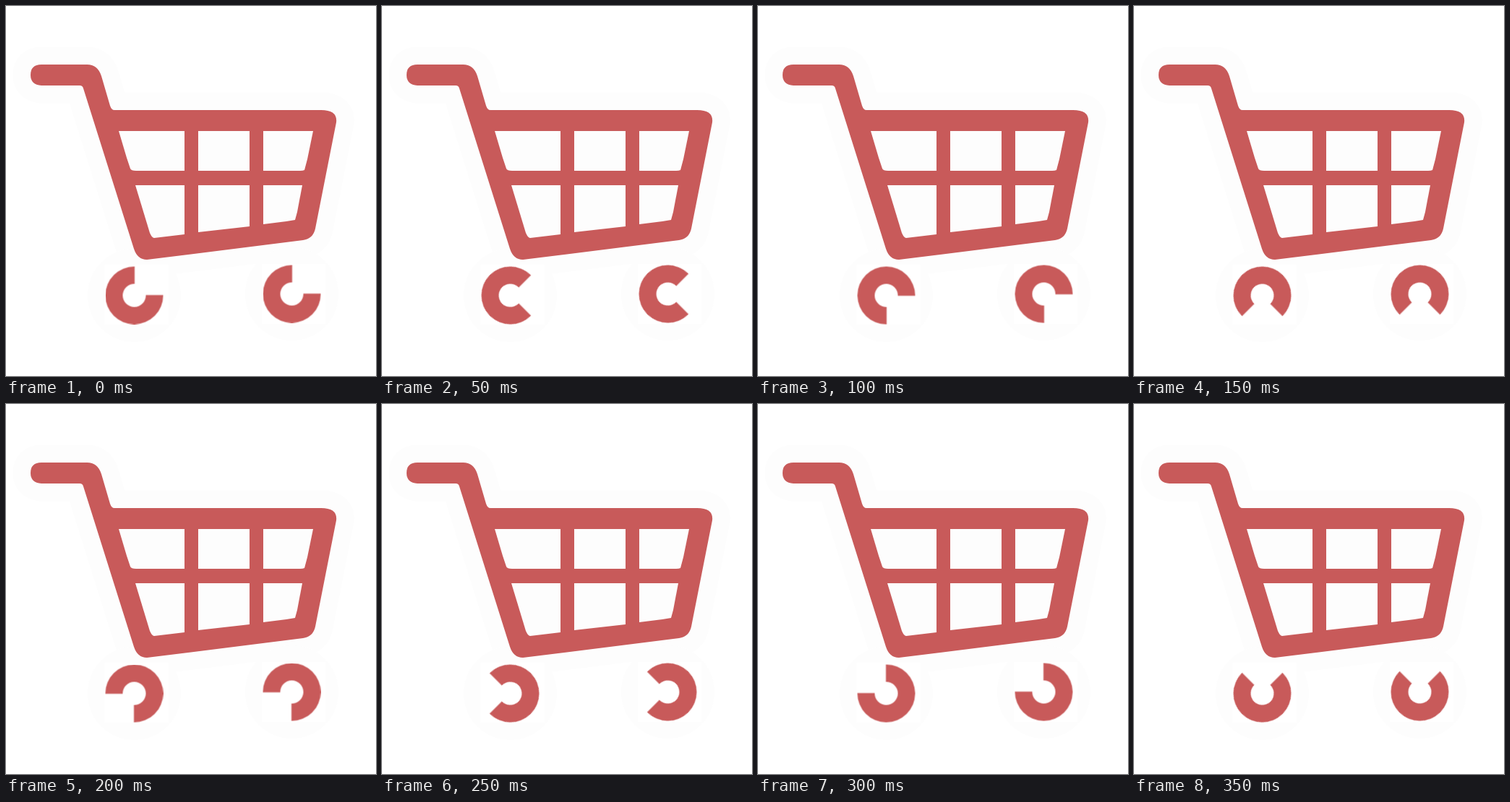
An HTML page for the animation above (400 ms loop, 512x512 px).

```html
<!DOCTYPE html>
<html lang="en">
<head>
<meta charset="utf-8">
<title>Rolling shopping cart</title>
<style>
  html, body { margin: 0; width: 100%; height: 100%; overflow: hidden; background: #fff; }
  svg { display: block; width: 100%; height: 100%; fill: #c85a5a; }
  .halo { fill: #fdfdfd; stroke: #fdfdfd; stroke-width: 49; stroke-linejoin: round; }
  .clear { fill: #fff; }
  .wheel { animation: roll 400ms steps(8) infinite; transform-origin: 0 0; }
  @keyframes roll { to { transform: rotate(360deg); } }
</style>
</head>
<body>
<svg viewBox="0 0 512 512">
  <defs>
    <path id="frame" d="M49 81H112Q127 81 132 97L144 138Q146 144 150 144H436Q459 144 457 161L428 308Q425 322 411 324L195 351Q182 351 177 336L107 114Q106 110 102 110H49Q34 109 34 95.5Q34 81 49 81Z"/>
    <path id="ring" d="M.5-40A40 40 0 1 0 40-.5H16A16 16 0 1 1 .5-16Z"/>
  </defs>

  <g class="halo">
    <use href="#frame"/>
    <circle cx="177.5" cy="400.5" r="40"/>
    <circle cx="395.5" cy="398.5" r="40"/>
  </g>
  <path class="clear" d="M136 358H225V441H136ZM354 357H442V440H354Z"/>

  <use href="#frame"/>
  <g fill="#fdfdfd">
    <path d="M156 173H247V228H180Q173 228 172 225L167 210Z"/>
    <path d="M266 173H337V228H266Z"/>
    <path d="M356 173H425L417 212L413 227Q411 228 407 228H356Z"/>
    <path d="M179 248H247V316L205 321Q202 321 199 314Z"/>
    <path d="M266 248H337V305L266 313Z"/>
    <path d="M356 248H410L403 285L400 296L388 298L356 302Z"/>
  </g>

  <g transform="translate(177.5 400.5)"><g class="wheel"><use href="#ring"/></g></g>
  <g transform="translate(395.5 398.5)"><g class="wheel"><use href="#ring"/></g></g>
</svg>
</body>
</html>
```
